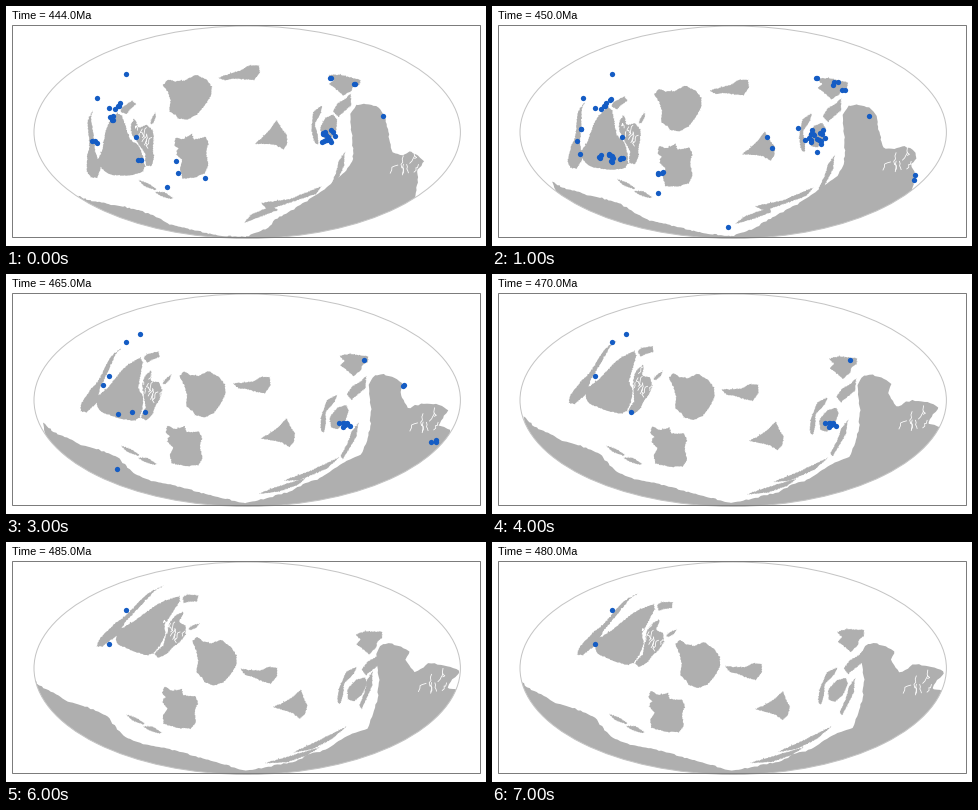
A matplotlib script for the animation above (8000 ms loop, 480 by 240 pixels).

```python
import numpy as np
import matplotlib.pyplot as plt
from matplotlib.animation import ArtistAnimation
from matplotlib.patches import Ellipse, Polygon, Rectangle

W, H, DPI = 480, 240, 100
PX = 72 / DPI
LAND, DOT = "#afafaf", "#145cc4"
AGES = [444, 450, 460, 465, 470, 480, 485, 480]
CX, CY, RX, RY = 241.2, 126.2, 213.2, 106.2
SAMPLES = 200
rng = np.random.default_rng(7)


# Mollweide projection between screen pixels and unit vectors
def to_sphere(pts):
    x, y = np.asarray(pts, float).T
    theta = np.arcsin(np.clip((CY - y) / RY, -1, 1))
    lat = np.arcsin((2 * theta + np.sin(2 * theta)) / np.pi)
    lon = np.pi * (x - CX) / (RX * np.cos(theta))
    return np.column_stack([np.cos(lat) * np.cos(lon),
                            np.cos(lat) * np.sin(lon), np.sin(lat)])


THETA = np.linspace(-np.pi / 2, np.pi / 2, 2001)
SIN_LAT = (2 * THETA + np.sin(2 * THETA)) / np.pi


def to_screen(v):
    theta = np.interp(v[:, 2], SIN_LAT, THETA)
    lon = np.arctan2(v[:, 1], v[:, 0])
    return np.column_stack([CX + RX * lon / np.pi * np.cos(theta),
                            CY - RY * np.sin(theta)])


def local_frame(point):
    up = to_sphere([point])[0]
    east = np.cross([0, 0, 1], up)
    east /= np.linalg.norm(east)
    return np.column_stack([east, np.cross(up, east), up])


def drift(age, old, mid, new):
    """Quadratic through the values at 444, 460 and 480 Ma."""
    a, b, c = age - 444, age - 460, age - 480
    old, mid, new = (np.asarray(k, float) for k in (old, mid, new))
    return old * b * c / 576 - mid * a * c / 320 + new * a * b / 720


def resample(pts):
    loop = np.vstack([pts, pts[:1]])
    s = np.r_[0, np.cumsum(np.hypot(*np.diff(loop, axis=0).T))]
    u = np.linspace(0, s[-1], SAMPLES, endpoint=False)
    return np.column_stack([np.interp(u, s, loop[:, i]) for i in (0, 1)])


def shape(*xy):
    return resample(np.reshape(xy, (-1, 2)))


class Plate:
    """Outlines drawn at 480 Ma, turned rigidly over the globe.

    A pose is x, y and clockwise spin in degrees.
    """

    def __init__(self, poses, *outlines):
        self.poses = poses
        home = local_frame(poses[-1][:2])
        self.parts = [to_sphere(o) @ home for o in outlines]

    def outlines(self, age):
        x, y, spin = drift(age, *self.poses)
        c, s = np.cos(np.radians(spin)), np.sin(np.radians(spin))
        turn = np.array([[c, s, 0], [-s, c, 0], [0, 0, 1]])
        move = local_frame((x, y)) @ turn
        return [to_screen(p @ move.T) for p in self.parts]


class Coast:
    """A large coastline that slides between two outlines."""

    def __init__(self, old, new):
        self.old, self.new = (np.reshape(p, (-1, 2)) for p in (old, new))

    def outlines(self, age):
        u = drift(age, 0, 0.6, 1)
        return [resample(self.old + u * (self.new - self.old))]


laurentia = Plate(
    [(104, 136, -20), (109, 116, -7), (133, 84, 0)],
    shape(155,88, 162,80, 168,78, 164,88, 171,91, 172,100, 167,108, 160,114,
          155,121, 147,125, 143,121, 151,112, 153,100),
    shape(103,107, 104,98, 119,89, 137,74, 148,67, 162,62, 163,67, 154,84,
          150,92, 152,102, 148,112, 142,121, 135,123, 124,120, 106,112),
    shape(146,51, 137,58, 129,68, 112,88, 104,103, 91,113, 85,113, 87,106,
          94,98, 102,90, 112,82, 122,70, 132,59),
    shape(165,63, 170,60, 181,60, 180,66, 172,67, 167,69),
    shape(174,94, 178,90, 185,87, 182,92, 177,95))
siberia = Plate(
    [(183, 90, -10), (195, 115, -6), (207, 122, 0)],
    shape(183,102, 188,98, 194,102, 202,104, 212,100, 222,107, 228,115,
          228,125, 223,134, 215,143, 206,146, 197,143, 194,138, 188,133,
          190,122, 187,110))
baltica = Plate(
    [(186, 151, -18), (180, 171, -8), (174, 172, 0)],
    shape(156,155, 159,149, 167,153, 176,151, 178,157, 190,158, 193,164,
          190,172, 192,184, 187,190, 175,190, 160,186, 158,178, 163,171,
          157,164, 160,159))
avalonia = Plate(
    [(150, 184, 0), (135, 182, 0), (135, 182, 0)],
    shape(117,172, 126,175, 136,181, 134,182, 123,178),
    shape(134,184, 143,184, 153,190, 150,191, 140,188))
blade = Plate(
    [(235, 68, -14), (245, 103, -7), (253, 129, 0)],
    shape(233,124, 242,125, 253,125, 262,121, 270,122, 270,130, 264,138,
          256,136, 246,132, 238,130))
fin = Plate(
    [(268, 132, -8), (273, 157, -5), (284, 166, 0)],
    shape(263,167, 271,164, 281,158, 288,152, 291,149, 294,157, 298,165,
          296,173, 291,178, 284,173, 274,170))
cap = Plate(
    [(338, 78, 12), (345, 87, 6), (359, 97, 0)],
    shape(345,90, 355,87, 372,88, 372,94, 367,98, 366,103, 359,110, 352,104,
          346,100, 350,95))
terranes = Plate(
    [(319, 120, -8), (326, 138, -3), (342, 146, 0)],
    shape(326,160, 328,146, 335,130, 346,125, 342,133, 333,142, 332,154,
          329,163),
    shape(336,148, 345,138, 354,136, 356,142, 351,153, 343,160, 337,158))
arc = Plate(
    [(333, 160, -5), (342, 164, -3), (357, 150, 0)],
    shape(363,136, 362,150, 356,162, 350,174, 348,170, 354,157, 357,145))
shard = Plate(
    [(336, 98, 0), (347, 110, 0), (362, 119, 0)],
    shape(372,108, 366,114, 358,118, 352,126, 356,132, 364,126, 371,120))

# Outer points overshoot the globe and are clipped by it
west = Coast(
    [72,190, 85,195, 98,197, 108,199, 128,203, 138,206, 147,209, 154,213,
     163,218, 178,222, 215,230, 246,231, 241,238, 160,238, 95,225],
    [24,134, 36,146, 50,153, 62,160, 92,170, 103,176, 112,187, 122,197,
     140,203, 170,209, 212,221, 246,231, 241,238, 160,238, 33,195])
east = Coast(
    [344,108, 350,99, 361,98, 372,101, 379,110, 382,124, 386,146, 396,150,
     404,145, 413,150, 418,156, 411,164, 412,172, 408,200, 365,225, 300,238,
     241,238, 240,231, 262,222, 270,213, 285,205, 302,194, 318,184, 330,174,
     340,165, 347,154, 347,138, 345,122],
    [369,112, 373,103, 382,101, 395,105, 403,110, 399,118, 408,131, 424,122,
     440,125, 453,130, 444,140, 440,147, 456,150, 448,185, 400,220, 320,238,
     241,238, 235,230, 260,225, 290,219, 302,212, 320,207, 333,198, 346,191,
     361,186, 366,172, 371,155, 372,138])
ridge = Coast([255,197, 284,193, 316,180, 310,188, 262,204],
              [286,210, 312,198, 340,184, 325,197, 305,207])
shoal = Coast([238,217, 246,208, 266,200, 272,204, 254,211],
              [258,221, 275,216, 312,205, 300,213, 280,220])
WORLD = [laurentia, siberia, baltica, avalonia, blade, fin, cap, terranes,
         arc, shard, west, east, ridge, shoal]

# Fossil sites: single points by age span, then x, y, spread, count, span
SITES = {
    (444, 485): [(119.5, 68), (102.5, 101.5)],
    (444, 460): [(129.5, 130.5), (109, 103)],
    (444, 450): [(91, 91.5), (377, 109.5)],
    (444, 444): [(170, 155), (171.5, 167), (161, 181), (199, 171.5)],
    (450, 450): [(85, 135), (87.5, 147.5), (166, 187), (306, 121.5)],
    (450, 460): [(235.5, 221), (275, 131), (280, 141.5), (313, 133.5),
                 (325, 146)],
    (460, 465): [(96.5, 111), (112, 140), (126, 138), (111, 194.5)],
    (460, 470): [(138.5, 137.5)],
    (465, 470): [(134, 59.5), (357.5, 85.5)],
}
CLUSTERS = [
    (113, 98, 2, 3, 444, 460), (107, 110, 4, 4, 444, 444),
    (88, 137, 3, 3, 444, 444), (134, 154, 2, 3, 444, 444),
    (325, 72, 1, 2, 444, 450), (348, 77.5, 2, 2, 444, 444),
    (322, 131, 8, 15, 444, 444), (325, 130, 9, 15, 450, 450),
    (118.5, 93, 1, 2, 450, 460), (89, 123, 1, 2, 450, 460),
    (117, 152, 5, 8, 450, 460), (108, 152, 3, 3, 450, 450),
    (130, 151, 3, 3, 450, 460), (168, 167, 3, 4, 450, 460),
    (344, 77.5, 3, 3, 450, 460), (352, 83, 2, 2, 450, 460),
    (422, 172, 3, 2, 450, 450), (327, 137, 9, 11, 460, 460),
    (397, 112.5, 2, 2, 460, 465), (429, 169, 4, 3, 460, 465),
    (338, 150, 7, 8, 465, 470),
]


def scatter(x, y, spread, count):
    r = spread * np.sqrt(rng.random(count))
    a = rng.random(count) * 2 * np.pi
    return np.column_stack([x + r * np.cos(a), y + r * np.sin(a)])


finds = [(span, np.array(pts)) for span, pts in SITES.items()]
finds += [(tuple(c[4:]), scatter(*c[:4])) for c in CLUSTERS]


def cracks(ax, anchor, spread, count, seed):
    """Fine white rifts scattered around an anchor."""
    gen = np.random.default_rng(seed)
    lines = []
    for _ in range(count):
        start = anchor + gen.uniform(-1, 1, 2) * spread
        steps = gen.normal([0.6, -1.8], [1.2, 1.2], (5, 2))
        x, y = (start + np.cumsum(steps, axis=0)).T
        lines += ax.plot(x, y, color="white", lw=0.8 * PX, zorder=2)
    return lines


fig = plt.figure(figsize=(W / DPI, H / DPI), dpi=DPI, facecolor="white")
ax = fig.add_axes([0, 0, 1, 1])
ax.set(xlim=(0, W), ylim=(H, 0))
ax.axis("off")
ax.add_patch(Rectangle((6.5, 19.5), 468, 212, fill=False, ec="#7c7c7c",
                       lw=PX, snap=False, zorder=5))
globe = Ellipse((CX, CY), 2 * RX, 2 * RY, fill=False, ec="#c4c4c4", lw=PX,
                zorder=3)
ax.add_patch(globe)
roughness = rng.normal(0, 0.35, (SAMPLES, 2))


def scene(age):
    items = [ax.text(6.5, 13, f"Time = {age:.1f}Ma", family="Liberation Sans",
                     size=11 * PX, color="black")]
    for body in WORLD:
        for pts in body.outlines(age):
            patch = ax.add_patch(Polygon(pts + roughness, fc=LAND, lw=0,
                                         zorder=1))
            patch.set_clip_path(globe)
            items.append(patch)
    arctic = laurentia.outlines(age)[0].mean(axis=0)
    shore = drift(age, (398, 160), (414, 152), (425, 144))
    items += cracks(ax, arctic, (9, 16), 10, 3)
    items += cracks(ax, shore, (16, 12), 8, 5)
    dots = np.vstack([pts for (first, last), pts in finds
                      if first <= age <= last])
    items += ax.plot(*dots.T, "o", ms=5.3 * PX, color=DOT, mew=0, zorder=4)
    return items


anim = ArtistAnimation(fig, [scene(age) for age in AGES], interval=1000,
                       repeat=True, repeat_delay=0)
plt.show()
```
